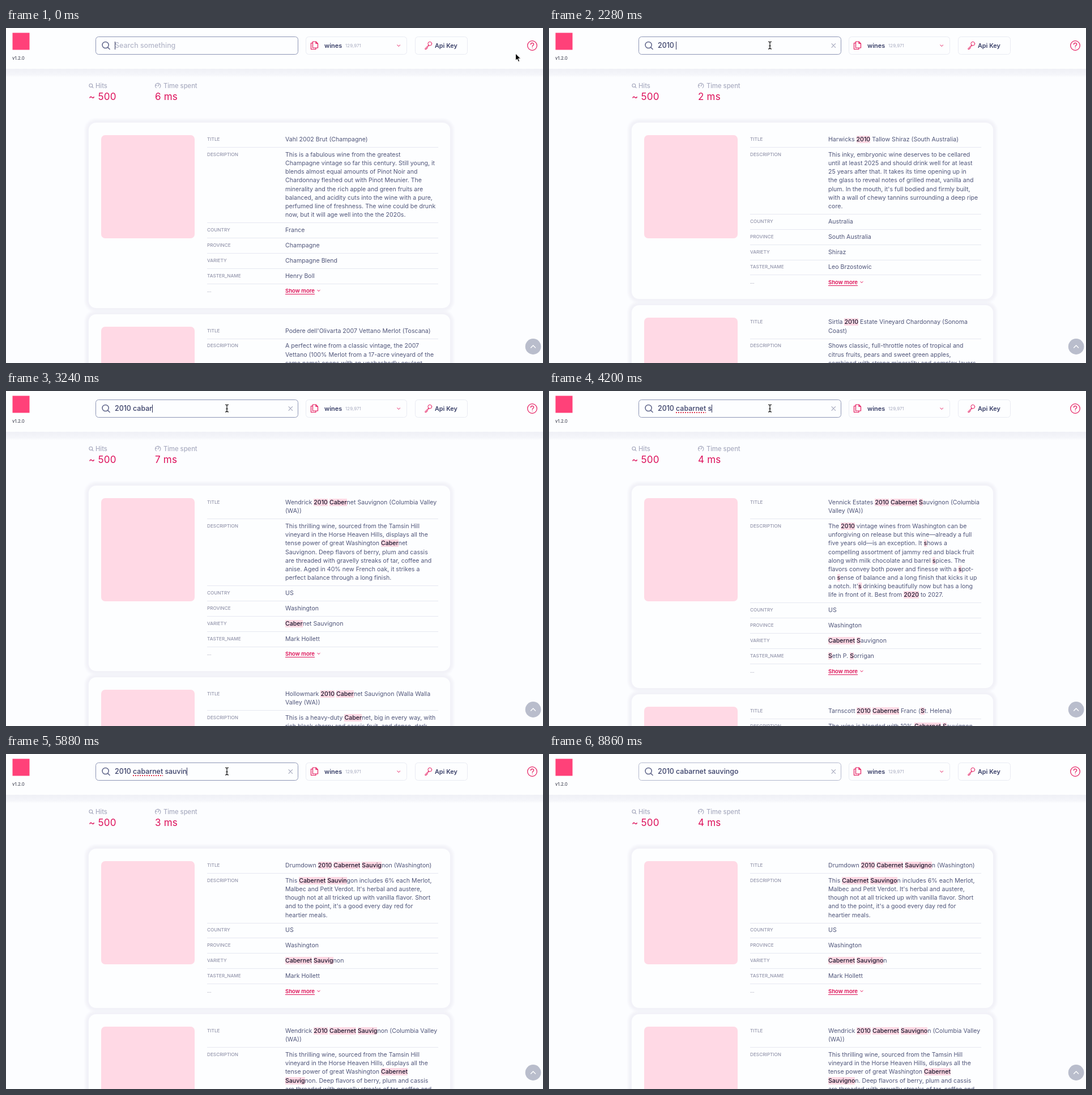
Animation of 948 by 591 pixels, one loop 8.88 s. Source, as an HTML page:

```html
<!DOCTYPE html>
<html lang="en">
<head>
<meta charset="utf-8">
<title>Wine search</title>
<style>
  html, body { margin: 0; width: 100%; height: 100%; overflow: hidden; background: #fcfdff; }
  body { position: relative; font-family: Inter, "Open Sans", sans-serif; color: #50567a; }
  #cards { position: absolute; left: 146px; top: 167px; width: 638px; }
  .card {
    position: relative; box-sizing: border-box; margin-bottom: 11px; padding: 22px 21px 22px 209px;
    border-radius: 13px; background: #fdfeff; box-shadow: 0 0 4px 6px #f2f2f8;
  }
  .thumb { position: absolute; left: 21.5px; top: 22px; width: 165.5px; height: 182px; border-radius: 7px; background: #ffd9e5; }
  .row {
    display: flex; padding: 4.9px 0 5.85px; border-bottom: 1px solid #e6e8f1;
    font-size: 10.6px; line-height: 15.15px; white-space: nowrap;
  }
  .row:nth-child(2) { padding-top: 0; }
  .row:last-child { padding-bottom: 0; border: 0; }
  .label { width: 138px; flex: none; font-size: 8.2px; font-weight: 500; color: #9395ab; }
  mark { background: #ffd9e4; color: #17152b; font-weight: 500; }
  .more { font-size: 9.6px; font-weight: 600; color: #dd0f55; text-decoration: underline; text-underline-offset: 2px; }
  .row svg { margin: 0 0 1px 4px; }
  .stage { position: absolute; left: 0; top: 0; width: 948px; height: 591px; }
  #field {
    position: absolute; left: 192px; top: 21px; line-height: 20px; white-space: pre;
    font-size: 12.4px; font-weight: 500; color: #3a4069;
  }
  #field u { text-decoration: underline dotted #e0394f 1.5px; text-underline-offset: 2px; text-decoration-skip-ink: none; }
  #caret {
    display: inline-block; height: 14px; margin-right: -1px; border-left: 1px solid #30355c; vertical-align: -3px;
  }
  #hint { color: #b4b7c9; }
  .ink { fill: #3a4069; font-weight: 600; }
  .mute { fill: #a9acc0; }
  .pink { fill: none; stroke: #e5175c; stroke-width: 1.2; stroke-linecap: round; stroke-linejoin: round; }
  .thin { stroke-width: 1; }
  .line { fill: none; stroke: #a2a5bb; stroke-width: 1.1; stroke-linecap: round; }
  .box { fill: #fdfeff; stroke: #e9ebf3; }
  .big { fill: #dd0f5a; font-size: 17px; letter-spacing: .2px; }
</style>
</head>
<body>
<div id="cards"></div>

<svg class="stage" viewBox="0 0 948 591">
  <defs>
    <linearGradient id="shade" x2="0" y2="1">
      <stop offset="0" stop-color="#eff0f6"/>
      <stop offset=".7" stop-color="#f5f6fa"/>
      <stop offset="1" stop-color="#fcfdff"/>
    </linearGradient>
  </defs>
  <rect width="948" height="72" fill="#fdfeff"/>
  <rect y="72" width="948" height="15" fill="url(#shade)"/>

  <rect x="11.5" y="8.5" width="30" height="30" fill="#ff4179"/>
  <text x="11" y="55.9" font-size="7.9" fill="#2d2f40">v1.2.0</text>

  <rect id="frame" class="box" x="158.5" y="15.5" width="357" height="31" rx="5"/>
  <g fill="none" stroke="#5f658a" stroke-width="1.5" stroke-linecap="round">
    <circle cx="175.6" cy="30" r="5.6"/><path d="M179.7 34.1l3.4 3.4"/>
  </g>
  <path id="clear" class="line" d="M499 27.7l6.6 6.6m0-6.6l-6.6 6.6"/>

  <rect class="box" x="529.5" y="15.5" width="178" height="31" rx="5"/>
  <path class="pink" d="M541.5 24h5.5l3.5 3.5v7.5h-9zM547 24v3.5h3.5M541.5 26.5h-3v11h8.5V35"/>
  <text class="ink" x="562" y="34.8" font-size="11">wines</text>
  <text class="mute" x="599" y="34" font-size="8">129,971</text>
  <path class="pink thin" d="M690.7 30l2.5 2.3 2.5-2.3"/>

  <rect class="box" x="722.5" y="15.5" width="92" height="31" rx="5"/>
  <g class="pink thin"><circle cx="748.3" cy="27.7" r="3.4"/><path d="M745.8 30.2l-6 6.2v1h2.4v-1.8h1.8v-1.8l2.8-2.7"/></g>
  <text class="ink" x="757" y="34.8" font-size="10.8">Api Key</text>

  <circle class="pink" cx="929" cy="31" r="8.3"/>
  <path class="pink" d="M926.4 29c0-3.6 5.3-3.5 5.3-.2 0 2-2.6 2-2.6 4m0 2.4v.1"/>

  <g class="line"><circle cx="149.8" cy="101.4" r="2.9"/><path d="M152 103.6l2 2"/></g>
  <text class="mute" x="158" y="106" font-size="11.2" font-weight="500">Hits</text>
  <text class="big" x="146" y="126.6">~ 500</text>
  <path class="line" d="M265.2 105.6a4.7 4.7 0 1 1 6 0M268.2 102.6l1.8-3M264.8 101.4h1M268.2 98.2v.6"/>
  <text class="mute" x="278" y="106" font-size="11.2" font-weight="500">Time spent</text>
  <text class="big" id="spent" x="263" y="126.6"></text>

  <circle cx="930.6" cy="562" r="13.9" fill="#b9bdcc"/>
  <path d="M926.6 564l4-4 4 4" fill="none" stroke="#fff" stroke-width="1.4" stroke-linecap="round"/>
</svg>

<div id="field"><span id="query"></span><span id="caret"></span><span id="hint">Search something</span></div>

<svg class="stage" viewBox="0 0 948 591">
  <g id="mouse">
    <path id="arrow" d="M0 0V12.4l2.9-2.6 2.1 4.7 2.2-1-2.1-4.5h4z" fill="#000" stroke="#fff" stroke-width="1"/>
    <path id="beam" d="M-3-6.5Q0-6.5 0-4.5V4.5Q0 6.5-3 6.5M3-6.5Q0-6.5 0-4.5M0 4.5Q0 6.5 3 6.5M-1.7 1h3.4" fill="none" stroke="#111" stroke-width="1.2"/>
  </g>
</svg>

<script>
const LOOP = 8880;
const $ = id => document.getElementById(id);
const LABELS = ["TITLE", "DESCRIPTION", "COUNTRY", "PROVINCE", "VARIETY", "TASTER_NAME"];

// Each wine: title, description, country, province, variety, taster; "|" breaks a line.
const wines = {
  vahl: ["Vahl 2002 Brut (Champagne)",
    "This is a fabulous wine from the greatest|Champagne vintage so far this century. Still young, it|blends almost equal amounts of Pinot Noir and|Chardonnay fleshed out with Pinot Meunier. The|minerality and the rich apple and green fruits are|balanced, and acidity cuts into the wine with a pure,|perfumed line of freshness. The wine could be drunk|now, but it will age well into the the 2020s.",
    "France", "Champagne", "Champagne Blend", "Henry Boll"],
  podere: ["Podere dell'Olivarta 2007 Vettano Merlot (Toscana)",
    "A perfect wine from a classic vintage, the 2007|Vettano (100% Merlot from a 17-acre vineyard of the|same name) opens with an unabashedly opulent"],
  cleft: ["2Cleft 2013 Zinfandel (Amador County)",
    "This wine is a prime example of a dry but deeply|satisfying style of Zin. It has aromas like dark|chocolate with hints of wood smoke and cedar from|aging in 50% new oak and focused, pure fruit flavors|on a firm, lip-smackingly tannic texture that begs for|another sip. It's not sweet, but so, so tempting.",
    "US", "California", "Zinfandel", "Tim Barlow"],
  thicket: ["2nd Thicket 2009 Syrah (Santa Maria Valley)",
    "Flashy and voluptuous. Santa Maria Valley Syrah|always has an enormous depth of fruit, spiciness,|rich tannins, bright acidity and a firm minerality, and|that's just what you'll find in this bottling. It's|marked by ripe blackberry, chocolate, bacon and"],
  harwick: ["Harwicks 2010 Tallow Shiraz (South Australia)",
    "This inky, embryonic wine deserves to be cellared|until at least 2025 and should drink well for at least|25 years after that. It takes its time opening up in|the glass to reveal notes of grilled meat, vanilla and|plum. In the mouth, it's full bodied and firmly built,|with a wall of chewy tannins surrounding a deep ripe|core.",
    "Australia", "South Australia", "Shiraz", "Leo Brzostowic"],
  sirtla: ["Sirtla 2010 Estate Vineyard Chardonnay (Sonoma|Coast)",
    "Shows classic, full-throttle notes of tropical and|citrus fruits, pears and sweet green apples,|combined with strong minerality and complex layers"],
  wendrick: ["Wendrick 2010 Cabernet Sauvignon (Columbia Valley|(WA))",
    "This thrilling wine, sourced from the Tamsin Hill|vineyard in the Horse Heaven Hills, displays all the|tense power of great Washington Cabernet|Sauvignon. Deep flavors of berry, plum and cassis|are threaded with gravelly streaks of tar, coffee and|anise. Aged in 40% new French oak, it strikes a|perfect balance through a long finish.",
    "US", "Washington", "Cabernet Sauvignon", "Mark Hollett"],
  hollow: ["Hollowmark 2010 Cabernet Sauvignon (Walla Walla|Valley (WA))",
    "This is a heavy-duty Cabernet, big in every way, with|rich black cherry and cassis fruit, and dense, dark"],
  vennick: ["Vennick Estates 2010 Cabernet Sauvignon (Columbia|Valley (WA))",
    "The 2010 vintage wines from Washington can be|unforgiving on release but this wine—already a full|five years old—is an exception. It shows a|compelling assortment of jammy red and black fruit|along with milk chocolate and barrel spices. The|flavors convey both power and finesse with a spot-|on sense of balance and a long finish that kicks it up|a notch. It's drinking beautifully now but has a long|life in front of it. Best from 2020 to 2027.",
    "US", "Washington", "Cabernet Sauvignon", "Seth P. Sorrigan"],
  tarn: ["Tarnscott 2010 Cabernet Franc (St. Helena)",
    "The wine is blended with 10% Cabernet Sauvignon,|and shows ripe fruit"],
  drum: ["Drumdown 2010 Cabernet Sauvignon (Washington)",
    "This Cabernet Sauvingon includes 6% each Merlot,|Malbec and Petit Verdot. It's herbal and austere,|though not at all tricked up with vanilla flavor. Short|and to the point, it's a good every day red for|heartier meals.",
    "US", "Washington", "Cabernet Sauvignon", "Mark Hollett"]
};

// Start time, typed text, wines shown, time spent, highlighted prefixes.
const states = [
  [0, "", "vahl podere", 6, ""],
  [1320, "2", "cleft thicket", 9, "2"],
  [1560, "20", "harwick sirtla", 5, "20"],
  [1680, "201", "harwick sirtla", 4, "201"],
  [1920, "2010", "harwick sirtla", 3, "2010"],
  [2280, "2010 ", "harwick sirtla", 2, "2010"],
  [2520, "2010 c", "harwick sirtla", 5, "2010|c"],
  [2760, "2010 ca", "vennick tarn", 6, "2010|ca"],
  [3000, "2010 cab", "drum wendrick", 5, "2010|cab"],
  [3240, "2010 cabar", "wendrick hollow", 7, "2010|caber"],
  [3600, "2010 cabarn", "wendrick hollow", 6, "2010|cabern"],
  [3720, "2010 cabarne", "wendrick hollow", 5, "2010|caberne"],
  [3960, "2010 cabarnet ", "wendrick hollow", 3, "2010|cabernet"],
  [4200, "2010 cabarnet s", "vennick tarn", 4, "2010|2020|cabernet|s"],
  [4560, "2010 cabarnet sa", "drum wendrick", 5, "2010|cabernet|sa"],
  [5040, "2010 cabarnet sau", "wendrick hollow", 4, "2010|cabernet|sau"],
  [5520, "2010 cabarnet sauv", "wendrick hollow", 3, "2010|cabernet|sauv"],
  [5760, "2010 cabarnet sauvi", "wendrick hollow", 4, "2010|cabernet|sauvi"],
  [5880, "2010 cabarnet sauvin", "drum wendrick", 3, "2010|cabernet|sauvig|sauvin"],
  [6120, "2010 cabarnet sauving", "drum wendrick", 5, "2010|cabernet|sauving|sauvig"],
  [6590, "2010 cabarnet sauvingo", "drum wendrick", 4, "2010|cabernet|sauvigno|sauvingo"]
];

// Pointer stops: time, x, y.
const stops = [
  [0, 899.5, 45], [120, 848, 41], [240, 706, 35], [360, 520, 30], [480, 393, 31], [720, 390, 30.5],
  [7430, 398, 36], [7549, 430, 62], [7667, 486, 112], [7786, 560, 188], [7904, 645, 282],
  [8023, 730, 375], [8141, 810, 460], [8260, 876, 527], [8380, 894, 557], [8500, 903, 578], [8620, 910, 610]
];

const dark = [[240, 720], [7070, 7550], [8030, 8500], [8860, LOOP]];
const BLUR = 8860, SPELL = 7430;

const at = (list, t) => list.findLast(e => e[0] <= t);

function card(name, prefixes) {
  const find = prefixes && new RegExp(`\\b(?:${prefixes})`, "gi");
  const paint = s => (find ? s.replace(find, "<mark>$&</mark>") : s).replaceAll("|", "<br>");
  const row = (label, value) => `<div class="row"><div class="label">${label}</div><div>${value}</div></div>`;
  const more = `<span class="more">Show more</span><svg width="6" height="5"><path class="pink thin" d="M.8 1.4L3 3.4 5.2 1.4"/></svg>`;
  return `<div class="card"><div class="thumb"></div>` +
    wines[name].map((v, i) => row(LABELS[i], paint(v))).join("") + row("...", more) + `</div>`;
}

function showResults([, text, names, ms, prefixes]) {
  $("cards").innerHTML = names.split(" ").map(n => card(n, prefixes)).join("");
  $("spent").textContent = ms + " ms";
  $("hint").style.display = text ? "none" : "";
  $("clear").style.display = text ? "" : "none";
}

function showQuery(text, t) {
  let html = text;
  if (t < BLUR) {
    html = html.replace(/cabarnet(?= )/, "<u>$&</u>");
    if (t >= SPELL) html = html.replace("sauvingo", "<u>$&</u>");
  }
  if ($("query").dataset.html !== html) {
    $("query").innerHTML = html;
    $("query").dataset.html = html;
  }
}

function showMouse([, x, y]) {
  const typing = x > 158 && x < 516 && y > 15 && y < 47;
  $("mouse").setAttribute("transform", `translate(${x} ${y})`);
  $("arrow").style.display = typing ? "none" : "";
  $("beam").style.display = typing ? "" : "none";
}

let shown;
function draw() {
  const t = performance.now() % LOOP;
  const state = at(states, t);
  if (state !== shown) showResults(shown = state);
  showQuery(state[1], t);
  showMouse(at(stops, t));
  $("caret").style.visibility = dark.some(([a, b]) => t >= a && t < b) ? "hidden" : "";
  $("frame").style.stroke = t < BLUR ? "#8d96b6" : "#b3b8cd";
  requestAnimationFrame(draw);
}
draw();
</script>
</body>
</html>
```
